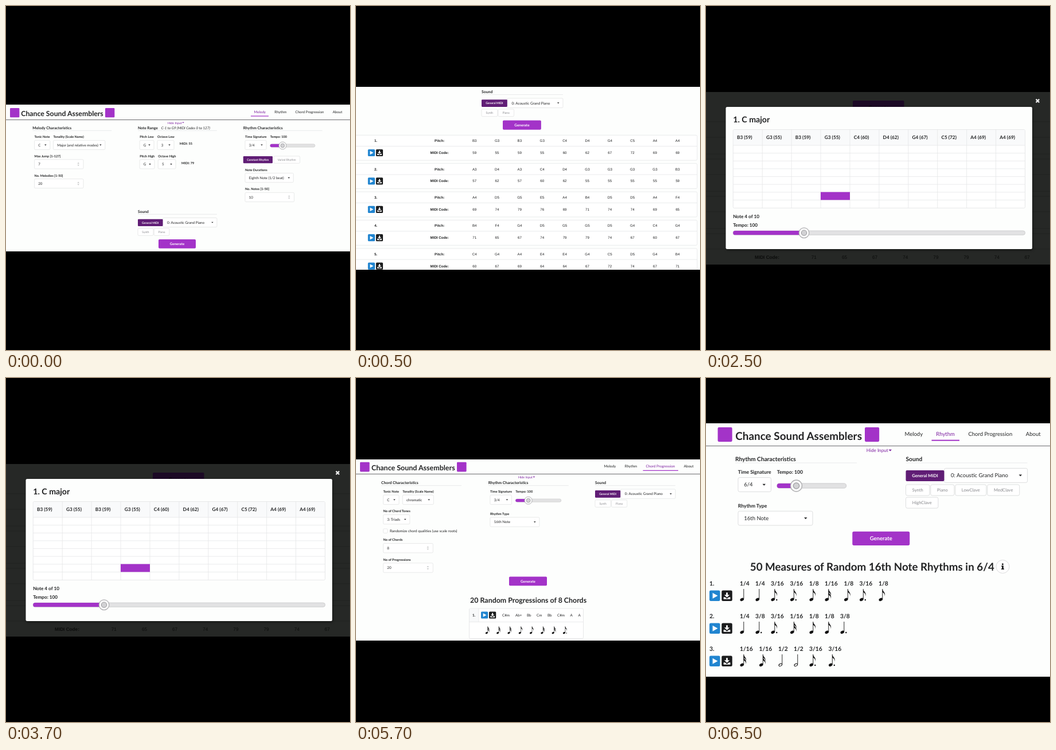
An HTML page that plays this animation: 600x600 px, repeating every 8 s.

```html
<!DOCTYPE html>
<html lang="en">
<head>
<meta charset="utf-8">
<title>Music generator tour</title>
<style>
html, body { margin: 0; width: 100%; height: 100%; overflow: hidden; background: #000; }
svg { display: block; width: 100vw; height: 100vh; }
text { font-family: Lato, sans-serif; fill: #222324; text-rendering: geometricPrecision; white-space: pre; }
.b { font-weight: 700; }
.i { font-style: italic; }
.m { text-anchor: middle; }
.h { font-family: "Liberation Sans", Arial, sans-serif; }
.w { fill: #fff; }
.p { fill: #7d1fa0; }
.g { fill: #85868a; }
.d { fill: #0b0c0b; }
.scene { opacity: 0; animation: 8s step-end infinite; }
#setup { animation-name: setup; }
#list { animation-name: list; }
#player { animation-name: player; }
#chords { animation-name: chords; }
#rhythm { animation-name: rhythm; }
@keyframes setup { 0% { opacity: 1 } 6.25%, 100% { opacity: 0 } }
@keyframes list { 0% { opacity: 0 } 6.25% { opacity: 1 } 31.25%, 100% { opacity: 0 } }
@keyframes player { 0% { opacity: 0 } 31.25% { opacity: 1 } 56.25%, 100% { opacity: 0 } }
@keyframes chords { 0% { opacity: 0 } 56.25% { opacity: 1 } 81.25%, 100% { opacity: 0 } }
@keyframes rhythm { 0% { opacity: 0 } 81.25%, 100% { opacity: 1 } }
</style>
</head>
<body>
<svg id="stage" viewBox="0 0 600 600" xmlns="http://www.w3.org/2000/svg"></svg>
<script>
const PURPLE = '#a333c8', DEEP = '#601d75', PAGE = '#fdfefd', EDGE = '#d6d7d8', PALE = '#e5e6e7';
const BRAND = 'Chance Sound Assemblers';
let k = 1; // page zoom of the scene being drawn

const text = (x, y, s, size, cls = '') =>
  `<text x="${x}" y="${y}" font-size="${size.toFixed(2)}" class="${cls}">${s}</text>`;
const rect = (x, y, w, h, fill, r = 0, more = '') =>
  `<rect x="${x}" y="${y}" width="${w}" height="${h}" rx="${r}" fill="${fill}" ${more}/>`;
const line = (x1, y1, x2, y2, color = PALE, w = 0.8) =>
  `<path d="M${x1} ${y1}L${x2} ${y2}" stroke="${color}" stroke-width="${w}"/>`;
const frame = (x, y, w, h) =>
  rect(x, y, w, h, '#fff', 4 * k, `stroke="${EDGE}" stroke-width="${1.2 * k}"`);

const body = (x, y, s, cls) => text(x, y, s, 14 * k, cls);
const label = (x, y, s) => text(x, y, s, 12.75 * k, 'b');
const caret = (x, y, fill = '#222324') =>
  `<path d="M${x - 4 * k} ${y - 2 * k}h${8 * k}l${-4 * k} ${4.4 * k}z" fill="${fill}"/>`;

const heading = (x, y, s) =>
  text(x, y, s, 15.05 * k, 'b') + line(x, y + 5.2 * k, x + 312 * k, y + 5.2 * k);

function select(x, y, w, s, pad = 15) {
  const h = 36.5 * k, c = y + h / 2;
  return frame(x, y, w, h) + body(x + pad * k, c + 5 * k, s) + caret(x + w - 18 * k, c);
}

function number(x, y, w, s) {
  const h = 36.5 * k, c = y + h / 2, sx = x + w - 20 * k;
  const tip = dir => `<path d="M${sx - 4 * k} ${c + dir * 2 * k}h${8 * k}l${-4 * k} ${dir * 5 * k}z" fill="#c4c5c6"/>`;
  return frame(x, y, w, h) + body(x + 15 * k, c + 5 * k, s) + tip(1) + tip(-1);
}

const darkButton = (x, y, w, s) => rect(x, y, w, 28 * k, DEEP, 3 * k) +
  text(x + w / 2, y + 18 * k, s, 11.1 * k, 'b m w');
const lightButton = (x, y, w, s) => frame(x, y, w, 28 * k) +
  text(x + w / 2, y + 18 * k, s, 11.1 * k, 'm g');
const generate = (x, y) => rect(x, y, 147 * k, 35.5 * k, PURPLE, 4 * k) +
  body(x + 73.5 * k, y + 22.8 * k, 'Generate', 'b m w');

function slider(x, y, w, pos) {
  const h = 12 * k, r = 14.7 * k;
  return rect(x, y - h / 2, w, h, '#e2e2e3', h / 2, `stroke="#c9c9ca" stroke-width="${1.4 * k}"`) +
    rect(x, y - h / 2, pos - x, h, PURPLE, h / 2) +
    `<circle cx="${pos}" cy="${y}" r="${r}" fill="#fafafa" stroke="#aeaeb0" stroke-width="${2 * k}"/>` +
    `<circle cx="${pos}" cy="${y}" r="${r * 0.52}" fill="#d2d2d4" stroke="#9b9b9e" stroke-width="${1.8 * k}"/>`;
}

function sound(x, y, extra = []) {
  const names = [['Synth', 61], ['Piano', 60.5], ...extra];
  const top = y + 19.2 * k;
  let out = heading(x, y, 'Sound') +
    select(x + 98.5 * k, top, 213.5 * k, '0: Acoustic Grand Piano', 17) +
    darkButton(x, y + 24.1 * k, 98.5 * k, 'General MIDI');
  let bx = x, by = y + 61 * k;
  for (const [s, w] of names) {
    if (bx + w * k > x + 312 * k) { bx = x; by += 32.4 * k; }
    out += lightButton(bx, by, w * k, s);
    bx += (w + 2.7) * k;
  }
  return out;
}

function header(o) {
  const side = 37 * k;
  let out = o.logos.map(x => rect(x, o.logoY, side, side, PURPLE, 3 * k)).join('') +
    text(o.x, o.y, BRAND, 27.8 * k, 'b') + line(0, o.rule, 600, o.rule, '#6b6b6e', 1);
  ['Melody', 'Rhythm', 'Chord Progression', 'About'].forEach((s, i) => {
    out += body(o.nav[i], o.navY, s, i === o.on ? 'p' : '');
  });
  const [a, b, y] = o.mark;
  return out + line(a, y, b, y, PURPLE, 2.8 * k) +
    text(o.hide[0], o.hide[1], 'Hide Input', 12 * k, 'p') +
    caret(o.hide[0] + 61 * k, o.hide[1] - 5 * k, '#7d1fa0');
}

// play and download buttons, side s
function actions(x, y, s) {
  const u = s / 12;
  return `<g transform="translate(${x} ${y}) scale(${u})">` +
    rect(0, 0, 12, 12, '#2185d0', 1.5) + '<path d="M3.6 2.8L9.4 6 3.6 9.2z" fill="#fff"/>' +
    '<g transform="translate(13.8)">' + rect(0, 0, 12, 12, '#1b1c1d', 1.5) +
    '<path d="M5.1 2.4h1.8v2.7H9L6 8 3 5.100h2.100zM2.200 7.600h1.700L6 9.400 8.100 7.600h1.700v2.300H2.200z" fill="#fff"/></g></g>';
}

// note glyph: left edge at x, bottom at y; flags, dot and open head
function note(x, y, u, { flags = 0, dot = 0, open = 0 }) {
  let d = '';
  for (let i = 0; i < flags; i++) {
    const t = -21 + i * 4.6;
    d += `<path d="M6.500 ${t}C6.800 ${t + 4.5} 12.800 ${t + 6} 10.300 ${t + 13}C11 ${t + 9} 9 ${t + 7} 6.500 ${t + 5.800}z"/>`;
  }
  const head = open
    ? '<ellipse cx="3.500" cy="-2.600" rx="3" ry="1.900" transform="rotate(-28 3.500 -2.600)" fill="none" stroke="#111" stroke-width="1"/>'
    : '<ellipse cx="3.500" cy="-2.600" rx="3.500" ry="2.400" transform="rotate(-28 3.500 -2.600)"/>';
  return `<g transform="translate(${x} ${y}) scale(${u})" fill="#111">${head}` +
    '<path d="M6.500 -3.600V-21" stroke="#111" stroke-width=".9"/>' + d +
    (dot ? '<circle cx="10" cy="-2" r="1.200"/>' : '') + '</g>';
}

const NOTES = {
  '1/2': { open: 1 }, '1/4': {}, '3/8': { dot: 1 },
  '1/8': { flags: 1 }, '3/16': { flags: 1, dot: 1 }, '1/16': { flags: 2 }
};

const page = (top, bottom, inner, fill = PAGE) =>
  rect(0, 0, 600, 600, '#000') + rect(0, top, 600, bottom - top, fill) + inner +
  rect(0, bottom, 600, 600 - bottom, '#000');

function setup() {
  k = 0.442;
  return page(172, 428,
    header({ logos: [7, 173], logoY: 178, x: 26.3, y: 191.5, rule: 198.5, nav: [432.5, 468.3, 504.5, 569.7],
      navY: 186.7, on: 0, mark: [427, 458, 192], hide: [282, 205.5] }) +
    heading(46.3, 215, 'Melody Characteristics') + heading(230, 215, 'Note Range') +
    text(270.8, 215, 'C-1 to G9 (MIDI Codes 0 to 127)', 6.25, 'i') +
    heading(413.8, 215, 'Rhythm Characteristics') +
    label(49.5, 230, 'Tonic Note') + select(49.5, 234.4, 27.3, 'C') +
    label(82.5, 230, 'Tonality (Scale Name)') + select(82.5, 234.4, 90.3, 'Major (and relative modes)') +
    label(49.5, 263.7, 'Max Jump [1-127]') + number(49.5, 267.8, 85.5, '7') +
    label(49.5, 297.5, 'No. Melodies [1-50]') + number(49.5, 301.6, 85.5, '20') +
    label(233.2, 230, 'Pitch Low') + select(233.2, 234.4, 24.8, 'G') +
    label(264, 230, 'Octave Low') + select(264, 234.4, 29, '3') + label(302.7, 242.3, 'MIDI: 55') +
    label(233.2, 263.7, 'Pitch High') + select(233.2, 267.8, 25.8, 'G') +
    label(265.3, 263.7, 'Octave High') + select(265.3, 267.8, 30.7, '5') + label(306, 275.8, 'MIDI: 79') +
    label(417, 230, 'Time Signature') + select(417, 234.4, 37, '3/4') +
    label(460.7, 230, 'Tempo: 100') + slider(460.7, 243.5, 78.3, 482.4) +
    darkButton(413.8, 261.9, 51.2, 'Constant Rhythm') + lightButton(466.8, 261.9, 45.8, 'Varied Rhythm') +
    label(417, 287.5, 'Note Durations') + select(417, 291.5, 84.3, 'Eighth Note (1/2 beat)') +
    label(417, 321.2, 'No. Notes [1-50]') + number(417, 325.4, 85.6, '10') +
    sound(230, 361) + generate(266, 407));
}

const MELODIES = [
  'B3 G3 B3 G3 C4 D4 G4 C5 A4 A4', 'A3 D4 A3 C4 D4 G3 G3 G3 G3 B3', 'A4 D5 G5 E5 A4 B4 D5 D5 A4 F4',
  'B4 F4 G4 D5 G5 G5 D5 G4 C4 G4', 'C4 G4 A4 E4 E4 G4 C5 D5 G4 B4'
].map(s => s.split(' '));
const STEPS = { C: 0, D: 2, E: 4, F: 5, G: 7, A: 9, B: 11 };
const midi = n => STEPS[n[0]] + 12 * (+n[1] + 1);

function list() {
  k = 0.455;
  let out = sound(219, 152.2) + generate(256, 199.6);
  MELODIES.forEach((tune, i) => {
    const y = 225.3 + i * 49.4;
    out += rect(-10, y, 605, 43.8, '#fff', 2, `stroke="${PALE}" stroke-width=".8"`) +
      line(0, y + 19.3, 595, y + 19.3) +
      text(34.5, y + 11.800, i + 1 + '.', 6.2, 'h b m') + actions(20.8, y + 24.600, 12.200) +
      text(145.7, y + 11.800, 'Pitch:', 6.2, 'h b m') + text(145.7, y + 32.7, 'MIDI Code:', 6.2, 'h b m');
    tune.forEach((n, j) => {
      const x = 206.7 + j * 39.35;
      out += text(x, y + 11.800, n, 6.2, 'h m') + text(x, y + 32.7, midi(n), 6.2, 'h m');
    });
  });
  return page(141, 460, out);
}

function player() {
  k = 0.605;
  let out = rect(256, 165, 89.5, 21, '#1c0925', 2) + text(301, 180, 'Generate', 8.5, 'b m d');
  for (let i = 0; i < 4; i++) {
    for (const y of [202, 229, 258]) out += line(0, y + i * 65, 600, y + i * 65, '#212321', 0.9);
  }
  out += text(106.5, 440.6, 'MIDI Code:', 8.2, 'h b m d');
  MELODIES[3].slice(0, 8).forEach((n, j) => {
    out += text(188.3 + j * 53.15, 440.6, midi(n), 8.2, 'h m d');
  });
  out += '<path d="M575.600 162.600l5.600 5.600m0 -5.600l-5.600 5.600" stroke="#eee" stroke-width="2.300"/>' +
    rect(34.5, 176, 534.5, 248, PAGE, 2.5, 'style="filter:drop-shadow(1px 2px 2px rgba(0,0,0,.4))"') +
    text(47.3, 202.7, '1. C major', 14.2, 'b') +
    rect(47.3, 215.5, 509.2, 136.9, '#fff', 2, `stroke="${PALE}" stroke-width=".9"`) +
    rect(47.7, 215.9, 508.4, 27, '#f9fafb', 2);
  for (let i = 0; i < 8; i++) out += line(47.3, 243 + i * 13.63, 556.5, 243 + i * 13.63);
  MELODIES[0].forEach((n, j) => {
    const x = 47.3 + j * 50.92;
    if (j) out += line(x, 215.5, x, 352.4);
    out += text(x + 6.7, 232.2, `${n} (${midi(n)})`, 8.3, 'b');
  });
  out += rect(200, 324.5, 51, 13.8, PURPLE) + text(47.2, 369.7, 'Note 4 of 10', 8.2, 'b') +
    text(47.2, 385, 'Tempo: 100', 8.2, 'b') + slider(47.2, 395.7, 509.4, 171);
  return page(150, 451, out, '#262826');
}

function chords() {
  k = 0.449;
  let out = header({ logos: [7, 176], logoY: 146.8, x: 27, y: 161.3, rule: 167.5,
      nav: [432.5, 468.8, 505.5, 571.8], navY: 156, on: 2, mark: [500.5, 562, 161.3], hide: [283, 175] }) +
    heading(44, 185.3, 'Chord Characteristics') + heading(230.7, 185.3, 'Rhythm Characteristics') +
    label(47.5, 200.2, 'Tonic Note') + select(47.5, 204.2, 27.5, 'C') +
    label(81.3, 200.2, 'Tonality (Scale Name)') + select(81.3, 204.2, 54, 'chromatic') +
    label(47.5, 234.4, 'No of Chord Tones') + select(47.5, 238.5, 46.3, '3: Triads') +
    frame(47.5, 263, 7.5, 7.5) + body(58.9, 268.9, 'Randomize chord qualities (use scale roots)') +
    label(47.5, 284.300, 'No of Chords') + number(47.5, 288.5, 86.8, '8') +
    label(47.5, 318.6, 'No of Progressions') + number(47.5, 322.8, 86.8, '20') +
    label(233.900, 200.2, 'Time Signature') + select(233.9, 204.2, 37.6, '3/4') +
    label(278.3, 200.2, 'Tempo: 100') + slider(278.3, 213.6, 79.5, 300.6) +
    label(233.9, 238.800, 'Rhythm Type') + select(233.9, 243, 86, '16th Note') +
    sound(417, 185.3) + generate(267, 346.4) +
    text(300.6, 391.6, '20 Random Progressions of 8 Chords', 12.4, 'b m') +
    rect(197.5, 402, 199, 52.5, '#fff', 2, `stroke="${PALE}" stroke-width=".9"`) +
    rect(198, 402.4, 16, 22.8, '#f8f9fa') + line(197.5, 425.5, 396.5, 425.5) + line(214, 402, 214, 425.5) +
    text(205.6, 416, '1.', 6.3, 'b m') + actions(218, 407.400, 12.2);
  const names = ['C#m', 'Ab+', 'Bb', 'Cm', 'Bb', 'C#m', 'A', 'A'];
  const at = [255, 278, 298, 315, 334, 351, 373.5, 387.5];
  const kinds = ['1/16', '1/16', '1/16', '1/8', '1/8', '1/16', '1/16', '3/16'];
  names.forEach((s, i) => {
    out += body(at[i], 416, s) + note(225.7 + i * 19.3, 446.3, 0.63, NOTES[kinds[i]]);
  });
  return page(142, 458, out);
}

function rhythm() {
  k = 0.68;
  let out = header({ logos: [20.5, 277], logoY: 86, x: 51.3, y: 108, rule: 118.5,
      nav: [346.5, 401.3, 457.4, 557.8], navY: 100.5, on: 1, mark: [393.5, 442, 108.800], hide: [279.8, 129.4] }) +
    heading(51, 144.5, 'Rhythm Characteristics') +
    label(55.8, 167.2, 'Time Signature') + select(56, 173.6, 57.5, '6/4') +
    label(123.8, 167.2, 'Tempo: 100') + slider(123.8, 188, 120.8, 157.5) +
    label(55.8, 226, 'Rhythm Type') + select(56, 232.2, 130, '16th Note') +
    sound(348.5, 144.5, [['LowClave', 79.5], ['MedClave', 82.5], ['HighClave', 83]]) + generate(255.300, 267.8) +
    text(289.8, 336, '50 Measures of Random 16th Note Rhythms in 6/4', 18.8, 'b m') +
    `<circle cx="517.500" cy="329" r="11.500" fill="#fff" stroke="${EDGE}" stroke-width=".9"/>` +
    '<path d="M515.300 327.200h3.600v5.200h1.100v1.700h-5v-1.700h1.100v-3.500h-.8z" fill="#1b1c1d"/>' +
    '<circle cx="517.400" cy="324.800" r="1.500" fill="#1b1c1d"/>';
  const rows = [
    '1/4 1/4 3/16 3/16 1/8 1/16 1/8 3/16 1/8', '1/4 3/8 3/16 1/16 1/8 1/8 3/8', '1/16 1/16 1/2 1/2 3/16 3/16'
  ];
  rows.forEach((row, i) => {
    const y = 362.200 + i * 57;
    let x = 59;
    out += text(6, y, i + 1 + '.', 10.3, 'b') + actions(6, y + 8.3, 18.5);
    for (const v of row.split(' ')) {
      out += text(x, y, v, 10.3, 'b') + note(x + 0.3, y + 26.8, 1, NOTES[v]);
      x += v.length > 3 ? 33.5 : 27;
    }
  });
  return page(79, 521, out);
}

const scenes = { setup, list, player, chords, rhythm };
document.getElementById('stage').innerHTML = Object.entries(scenes)
  .map(([id, draw]) => `<g id="${id}" class="scene">${draw()}</g>`).join('');
</script>
</body>
</html>
```
